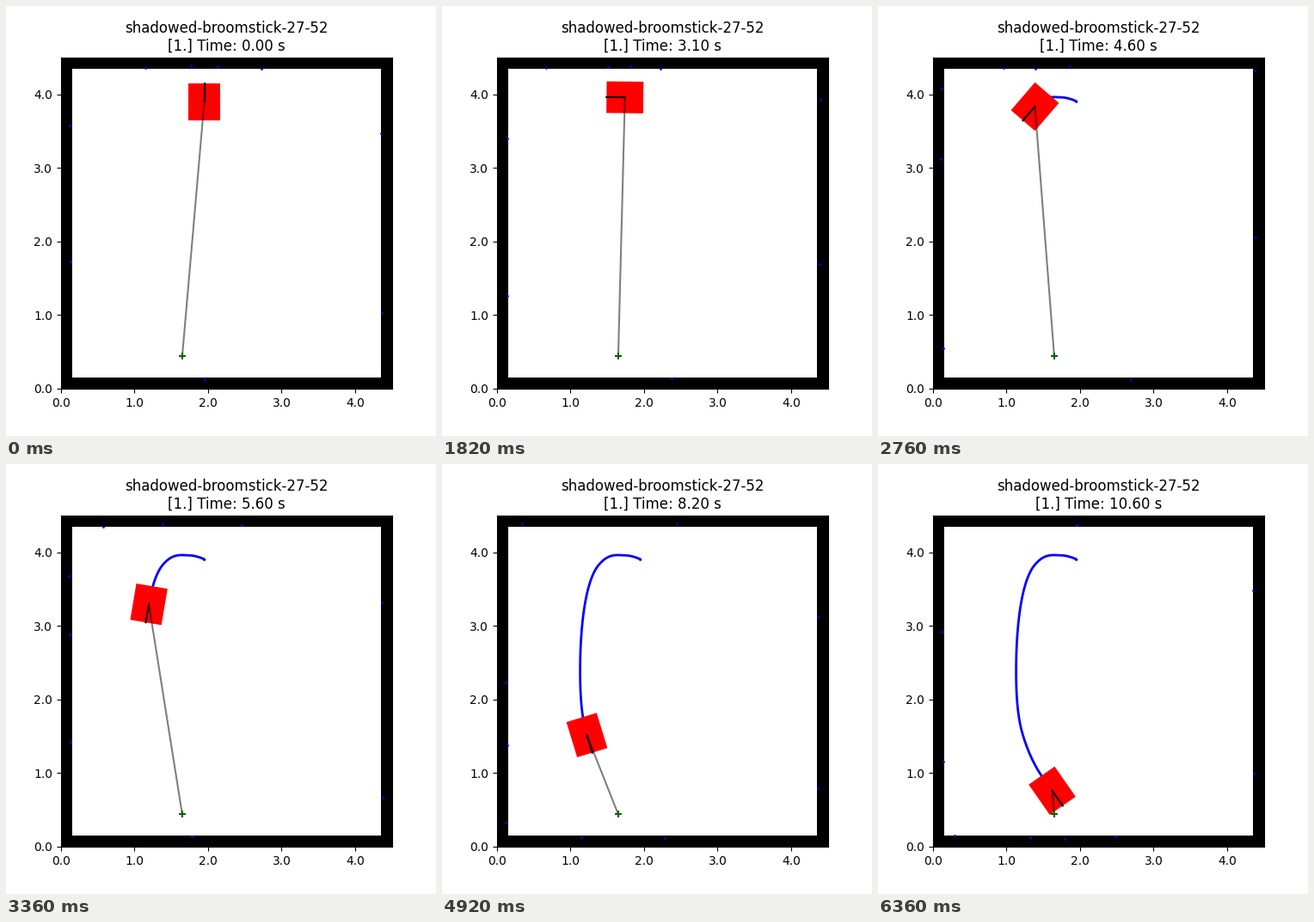
A matplotlib script for the animation above (6460 ms loop, 500 by 500 pixels).

```python
import matplotlib.pyplot as plt
import numpy as np
from matplotlib.animation import FuncAnimation
from matplotlib.patches import Polygon, Rectangle

SIZE, WALL = 4.5, 0.15
GOAL = (1.65, 0.44)
LENGTH, WIDTH = 0.5, 0.43
STEPS, TICK, LOOP = 107, 20, 6460
RAYS = np.radians(180 + 40 * np.arange(9))

# key poses: time [s], x, y, heading [deg], speed
KEYS = np.array([
    (0.0, 1.950, 3.900, 90.0, 0.00),
    (1.9, 1.947, 3.907, 139.3, 0.03),
    (3.1, 1.741, 3.960, 179.4, 0.22),
    (4.6, 1.388, 3.834, 229.3, 0.42),
    (6.7, 1.133, 2.495, 269.3, 0.68),
    (8.2, 1.224, 1.517, 287.0, 0.58),
    (10.6, 1.622, 0.762, 304.8, 0.20),
]).T


def drive(t):
    """Positions and headings along cubics that leave each key pose head-on."""
    when, x, y, deg, speed = KEYS
    angle = np.radians(deg)
    pos = x + 1j * y
    vel = speed * np.exp(1j * angle)
    i = np.clip(np.searchsorted(when, t, side="right") - 1, 0, len(when) - 2)
    h = when[i + 1] - when[i]
    u = (t - when[i]) / h
    step = pos[i + 1] - pos[i]
    p = (pos[i] + u * u * (3 - 2 * u) * step
         + u * (1 - u) * h * ((1 - u) * vel[i] - u * vel[i + 1]))
    v = (6 * u * (1 - u) * step / h
         + (1 - u) * (1 - 3 * u) * vel[i] + u * (3 * u - 2) * vel[i + 1])

    # the robot first turns on the spot, then faces the way it moves
    turn = angle[0] + (angle[1] - angle[0]) * (t / when[1]) ** 1.3
    heading = np.where(t < when[1], turn, np.angle(v) % (2 * np.pi))
    return p.real, p.imag, heading


times = np.arange(STEPS) / 10
xs, ys, headings = drive(times)


def body(x, y, a):
    """Corners of the robot's rectangle."""
    ahead = np.array([np.cos(a), np.sin(a)]) * LENGTH / 2
    side = np.array([-np.sin(a), np.cos(a)]) * WIDTH / 2
    return np.array([x, y]) + [ahead + side, ahead - side,
                               -ahead - side, -ahead + side]


def scan(n):
    """Points where the range sensor's rays meet the walls."""
    c, s = np.cos(headings[n] + RAYS), np.sin(headings[n] + RAYS)
    c, s = (np.where(np.abs(v) < 1e-9, 1e-9, v) for v in (c, s))
    to_x = (np.where(c > 0, SIZE - WALL, WALL) - xs[n]) / c
    to_y = (np.where(s > 0, SIZE - WALL, WALL) - ys[n]) / s
    noise = np.random.default_rng(n).uniform(0, 0.05, len(RAYS))
    r = np.minimum(to_x, to_y) + noise
    return xs[n] + r * c, ys[n] + r * s


fig, ax = plt.subplots(figsize=(5, 5), dpi=100)
ax.set_aspect("equal")
ax.set_xlim(0, SIZE)
ax.set_ylim(0, SIZE)
ticks = range(5)
labels = [f"{v:.1f}" for v in ticks]
ax.set_xticks(ticks, labels)
ax.set_yticks(ticks, labels)

inner = SIZE - WALL
for corner, w, h in [((0, 0), SIZE, WALL), ((0, inner), SIZE, WALL),
                     ((0, 0), WALL, SIZE), ((inner, 0), WALL, SIZE)]:
    ax.add_patch(Rectangle(corner, w, h, color="black", lw=0))

trail, = ax.plot([], [], color="blue", lw=2, zorder=2)
hits, = ax.plot([], [], "o", color="blue", ms=1, mew=1, zorder=3)
robot = ax.add_patch(Polygon(body(xs[0], ys[0], headings[0]),
                             facecolor="red", lw=0, zorder=4))
to_goal, = ax.plot([], [], color="black", alpha=0.5, lw=1.5, zorder=5)
nose, = ax.plot([], [], color="black", lw=1.5, zorder=6)
ax.plot(*GOAL, "+", color="darkgreen", ms=6, mew=1.5, zorder=7)
title = ax.set_title("shadowed-broomstick-27-52\n[1.] Time: 0.00 s")


def update(tick):
    # steps last 20 ms and 100 ms in turn
    pair, rest = divmod(tick * TICK, 120)
    n = min(2 * pair + (rest >= 20), STEPS - 1)
    x, y, a = xs[n], ys[n], headings[n]
    title.set_text(f"shadowed-broomstick-27-52\n[1.] Time: {times[n]:.2f} s")
    trail.set_data(xs[:n + 1], ys[:n + 1])
    hits.set_data(*scan(n))
    robot.set_xy(body(x, y, a))
    to_goal.set_data([x, GOAL[0]], [y, GOAL[1]])
    nose.set_data([x, x + LENGTH / 2 * np.cos(a)],
                  [y, y + LENGTH / 2 * np.sin(a)])
    return title, trail, hits, robot, to_goal, nose


anim = FuncAnimation(fig, update, frames=LOOP // TICK, interval=TICK,
                     repeat=True, repeat_delay=0)
plt.show()
```
